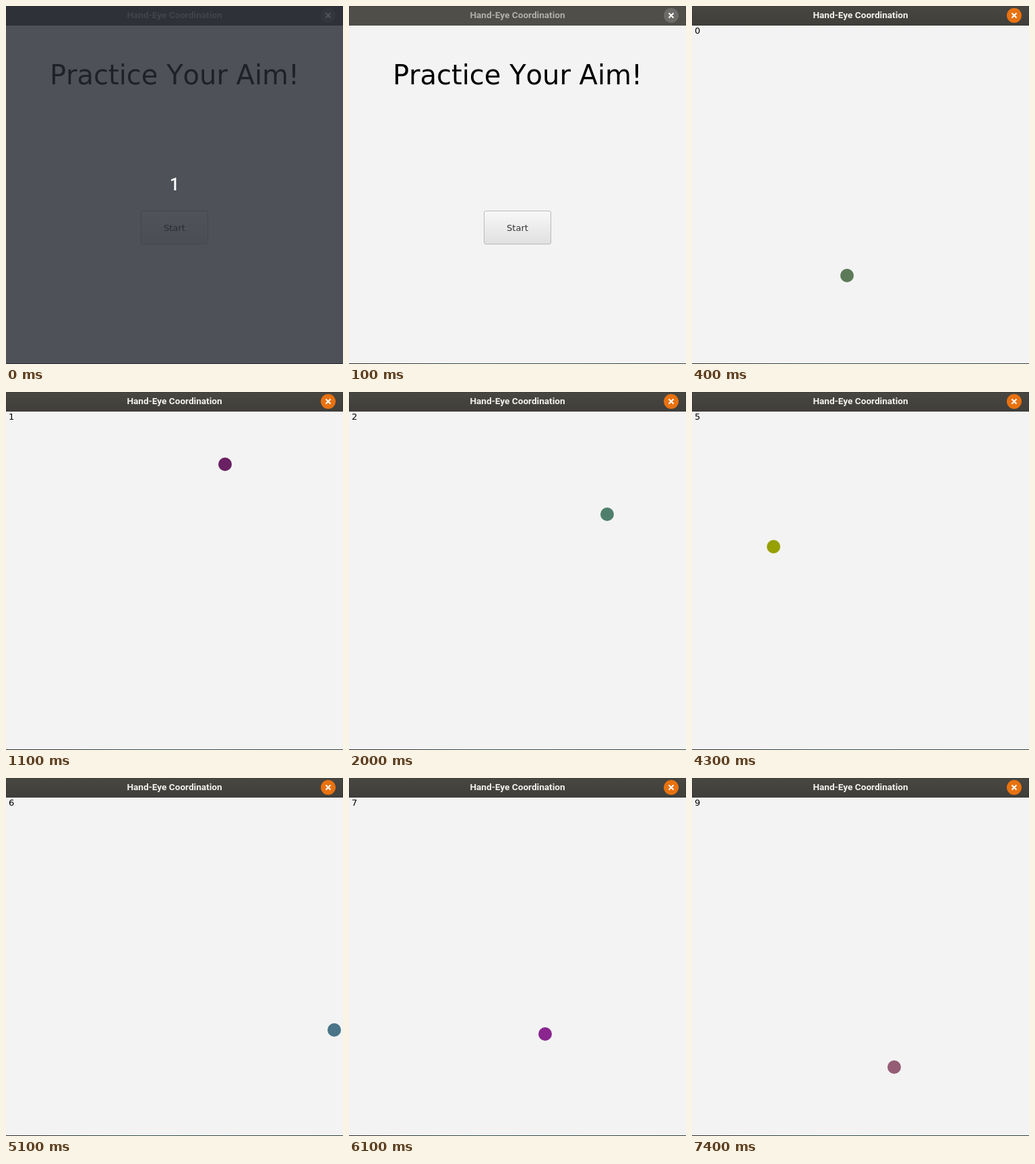
Write an HTML page that moves like this. It is 500 by 530 pixels and loops after 8 s.

```html
<!DOCTYPE html>
<html lang="en">
<head>
<meta charset="utf-8">
<title>Hand-Eye Coordination</title>
<style>
  html, body { margin: 0; width: 100%; height: 100%; overflow: hidden; }
  svg { display: block; width: 100vw; height: 100vh; }
  text { font-family: "DejaVu Sans", sans-serif; font-size: 13px; font-kerning: none; text-anchor: middle; }
  #caption { font: 700 13.6px Roboto, sans-serif; fill: #b0afab; }
  #bar { fill: #4f4e49; }
  #close { fill: #6c6b68; }
  .active #caption { fill: #f4f3f0; }
  .active #bar { fill: url(#barFill); }
  .active #close { fill: #e8720f; }
  #heading { font-size: 40px; }
  #button { fill: url(#buttonFill); stroke: #bababa; }
  .pressed #button { fill: url(#pressedFill); stroke: #039ed3; }
  #score { text-anchor: start; }
  #count { font: 500 25px Roboto, sans-serif; fill: #fff; }
</style>
</head>
<body>
<svg id="stage" viewBox="0 0 500 530">
  <defs>
    <linearGradient id="barFill" x2="0" y2="1">
      <stop stop-color="#484742"/><stop offset="1" stop-color="#3f3e3a"/>
    </linearGradient>
    <linearGradient id="buttonFill" x2="0" y2="1">
      <stop stop-color="#f8f8f8"/><stop offset="1" stop-color="#e0e0e0"/>
    </linearGradient>
    <linearGradient id="pressedFill" x2="0" y2="1">
      <stop stop-color="#dcdcdc"/><stop offset="1" stop-color="#cacaca"/>
    </linearGradient>
    <linearGradient id="edgeFill">
      <stop stop-color="#2c2a2c"/><stop offset=".12" stop-color="#2e3334"/>
      <stop offset=".4" stop-color="#365250"/><stop offset="1" stop-color="#303f40"/>
    </linearGradient>
  </defs>
  <rect width="500" height="530" fill="#f3f3f3"/>
  <rect id="bar" width="500" height="29"/>
  <path d="M.5 29V.5h499V29" fill="none" stroke="#000" stroke-opacity=".15"/>
  <rect y="529" width="500" height="1" fill="url(#edgeFill)"/>
  <text id="caption" x="250" y="18">Hand-Eye Coordination</text>
  <circle id="close" cx="478" cy="14" r="11"/>
  <path d="M474.5 10.5l7 7m0-7l-7 7" stroke="#fff" stroke-width="2"/>
  <g id="menu">
    <text id="heading" x="250" y="116">Practice Your Aim!</text>
    <rect id="button" x="200.5" y="303.5" width="99" height="49" rx="2.5"/>
    <text x="250" y="333" fill="#333">Start</text>
  </g>
  <g id="game">
    <text id="score" x="4" y="41"></text>
    <circle id="ball" r="10"/>
  </g>
  <g id="countdown">
    <rect width="500" height="530" fill="#262a32" fill-opacity=".8"/>
    <text id="count" x="250" y="273">1</text>
  </g>
</svg>
<script>
const LOOP = 8000, REVEAL = 100, PRESS = 300, PLAY = 400;

// Each target: time it appears, centre, colour. Its index is the score.
const targets = [
  [400, 230, 399, "#5c7a58"],
  [1100, 325, 107, "#6a2163"],
  [2000, 383, 181, "#4f7f6c"],
  [2900, 423, 159, "#1347a5"],
  [3600, 453, 207, "#8a5a4a"],
  [4300, 121, 229, "#96a000"],
  [5100, 487, 373, "#4a7488"],
  [6100, 291, 379, "#8a2590"],
  [6700, 387, 427, "#6f7850"],
  [7400, 300, 428, "#945d75"],
];

const el = id => document.getElementById(id);
const show = (id, visible) => { el(id).style.display = visible ? "" : "none"; };

function draw(now) {
  const t = now % LOOP;
  const playing = t >= PLAY;
  el("stage").classList.toggle("active", t >= PRESS);
  el("stage").classList.toggle("pressed", t >= PRESS && !playing);
  show("countdown", t < REVEAL);
  show("menu", !playing);
  show("game", playing);
  if (playing) {
    const score = targets.findLastIndex(([start]) => t >= start);
    const [, x, y, color] = targets[score];
    el("score").textContent = score;
    el("ball").setAttribute("cx", x);
    el("ball").setAttribute("cy", y);
    el("ball").setAttribute("fill", color);
  }
}

const begin = performance.now();
function tick() {
  draw(performance.now() - begin);
  requestAnimationFrame(tick);
}
tick();
</script>
</body>
</html>
```
